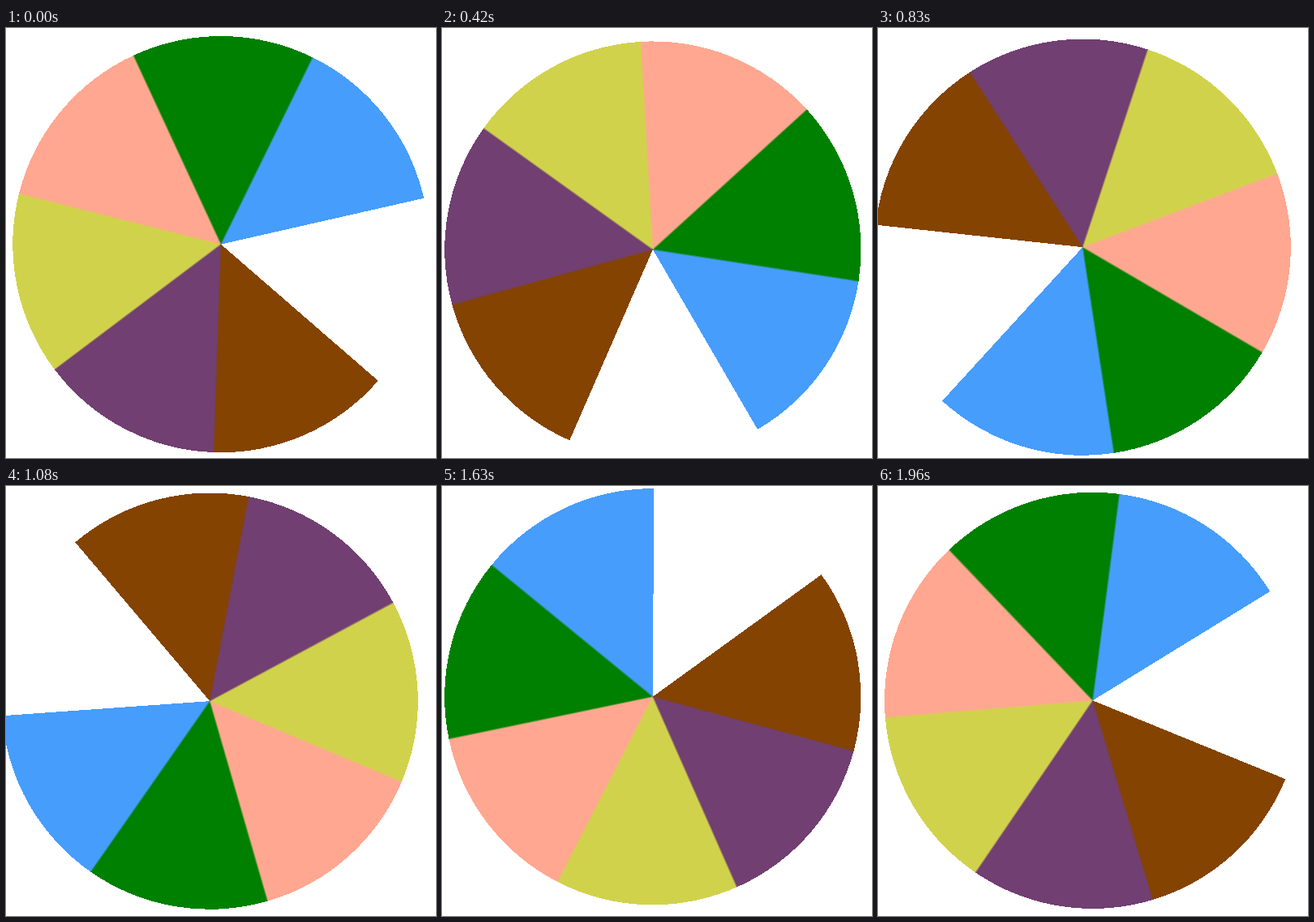
Animation of 530x530 px, one loop 2 s. Source, as an HTML page:

```html
<!DOCTYPE html>
<html lang="en">
<head>
<meta charset="utf-8">
<title>Spinning wheel</title>
<style>
  html, body { margin: 0; width: 100%; height: 100%; overflow: hidden; background: #fff; }
  svg { display: block; width: 530px; height: 530px; }
  .slice { shape-rendering: crispEdges; }
  .seam { stroke-width: 1.2px; }
</style>
</head>
<body>
<svg viewBox="0 0 530 530"><g id="wheel"></g></svg>
<script>
  const LOOP = 2000, STEPS = 48, TURN = 7.26;
  const PIVOT = { x: 258, y: 266.4 };
  const HUB = { x: PIVOT.x + 6.9, y: PIVOT.y + 0.2 }; // slightly off the pivot, so the wheel wobbles
  const RADIUS = 256.6, FIRST_EDGE = -12.8, SLICE = 51.04;
  const COLORS = ['#469dfc', '#008000', '#ffa790', '#d1d24b', '#713f71', '#844300'];

  const wheel = document.getElementById('wheel');

  function rim(deg) {
    const a = deg * Math.PI / 180;
    return `${HUB.x + RADIUS * Math.cos(a)} ${HUB.y + RADIUS * Math.sin(a)}`;
  }

  function addPath(name, d, style) {
    const path = document.createElementNS('http://www.w3.org/2000/svg', 'path');
    path.setAttribute('class', name);
    path.setAttribute('d', d);
    Object.assign(path.style, style);
    wheel.append(path);
  }

  const edges = COLORS.map((_, i) => FIRST_EDGE - i * SLICE);
  COLORS.forEach((fill, i) => addPath('slice',
    `M${HUB.x} ${HUB.y}L${rim(edges[i] - SLICE)}A${RADIUS} ${RADIUS} 0 0 1 ${rim(edges[i])}Z`,
    { fill }));

  // Blend neighbouring slices along their shared edge.
  COLORS.slice(1).forEach((color, i) => addPath('seam',
    `M${HUB.x} ${HUB.y}L${rim(edges[i + 1])}`,
    { stroke: `color-mix(in srgb, ${COLORS[i]}, ${color})` }));

  // Steps fall on whole hundredths of a second.
  function stepAt(ms) {
    const t = Math.floor(ms % LOOP / 10) * 10;
    return Math.ceil((t + 5) * STEPS / LOOP) - 1;
  }

  function draw(ms) {
    wheel.setAttribute('transform', `rotate(${stepAt(ms) * TURN} ${PIVOT.x} ${PIVOT.y})`);
  }

  const start = performance.now();
  function tick() {
    draw(performance.now() - start);
    requestAnimationFrame(tick);
  }
  tick();
</script>
</body>
</html>
```
